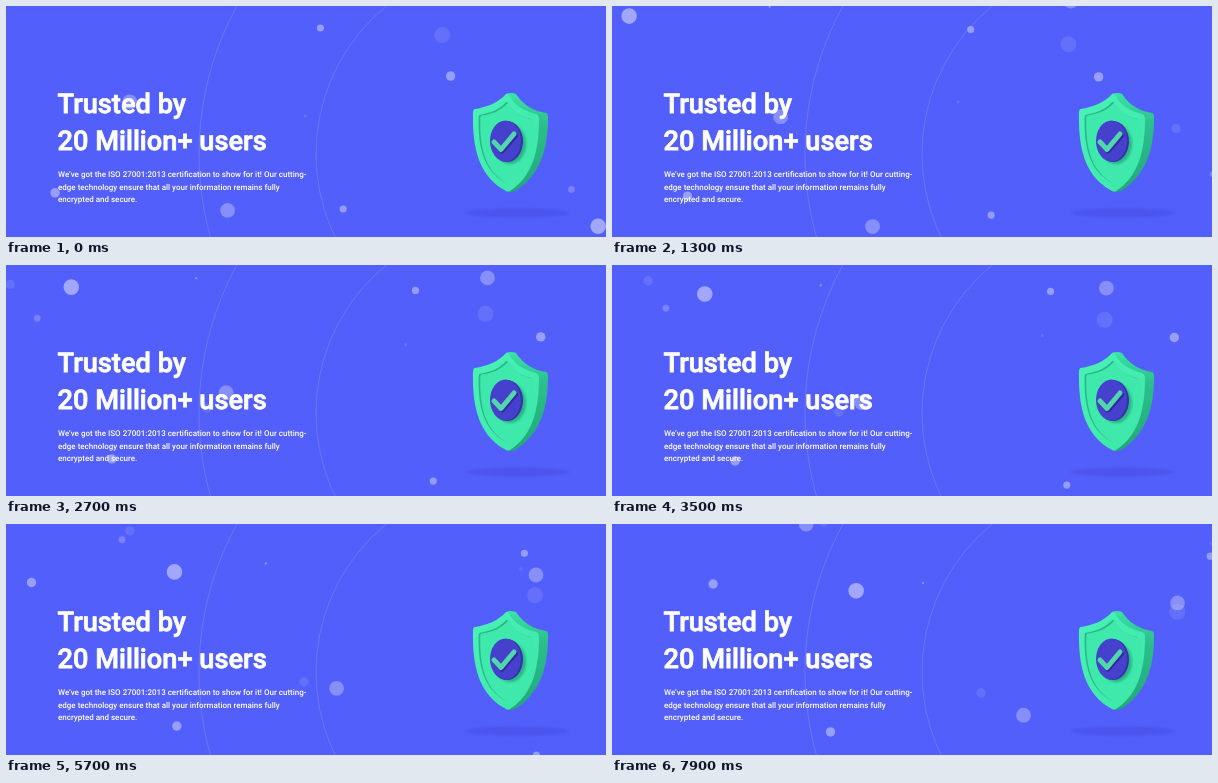
Recreate the animation shown at these times as an HTML page. Size 600 by 231 pixels, loop 8 s.

```html
<!DOCTYPE html>
<html lang="en">
<head>
<meta charset="utf-8">
<title>Trusted by 20 Million+ users</title>
<style>
  html, body { margin: 0; width: 100%; height: 100%; overflow: hidden; background: #535ffa; }
  svg { display: block; width: 600px; height: 231px; }
  text { font-family: Roboto, "Liberation Sans", sans-serif; font-weight: 500; fill: #fff; text-rendering: geometricPrecision; }
  .title { font-size: 27.2px; stroke: #fff; stroke-width: .8px; }
  .body { font-size: 8px; }
</style>
</head>
<body>
<svg viewBox="0 0 600 231">
  <defs>
    <linearGradient id="face" x1="0" y1="0" x2="1" y2="1">
      <stop offset="0" stop-color="#4bf2b8"/>
      <stop offset="1" stop-color="#3be6a6"/>
    </linearGradient>
    <linearGradient id="side" x1="0" y1="0" x2="0" y2="1">
      <stop offset="0" stop-color="#3be3a6"/>
      <stop offset=".3" stop-color="#2bc08d"/>
      <stop offset="1" stop-color="#22a67c"/>
    </linearGradient>
    <filter id="soft" x="-20%" y="-50%" width="140%" height="200%">
      <feGaussianBlur stdDeviation="1.2"/>
    </filter>
    <path id="plate" d="M500 88C492 97 481 101 469 103Q467 103 467 107C466 148 476 172 500 185Q502 186 504 185C524 172 533 150 533 113Q533 109 530 108C517 105 508 99 503 89Q501.5 87 500 88Z"/>
  </defs>
  <g fill="none" stroke="#fff" stroke-opacity=".14">
    <circle cx="501" cy="148" r="308"/>
    <circle cx="501" cy="148" r="191"/>
  </g>
  <g id="dots" fill="#fff"></g>

  <ellipse cx="511" cy="207" rx="52" ry="4.5" fill="#4b55ee" filter="url(#soft)"/>
  <path fill="url(#side)" d="M500 88Q505 86 510 88C518 100 528 105 540 107Q542.5 108 542 113C542 147 532 170 510 184.5Q505 187 500 185Z"/>
  <use href="#plate" fill="url(#face)"/>
  <g transform="translate(500 137) scale(.83) translate(-500 -137)">
    <use href="#plate" fill="#28b98a"/>
    <use href="#plate" x="2" y="1" fill="#3fe9ac"/>
  </g>
  <ellipse cx="504" cy="138" rx="16" ry="20" fill="#29b488" filter="url(#soft)"/>
  <ellipse cx="501" cy="135.5" rx="16" ry="20.5" fill="#3631a8"/>
  <ellipse cx="499.5" cy="135" rx="15.5" ry="20.5" fill="#4541cd"/>
  <g fill="none" stroke-width="5" stroke-linecap="round" stroke-linejoin="round">
    <path id="tick" stroke="#2f2a9c" d="M489 137.500l7 7.500l13.500-15.500"/>
    <path stroke="#52d6ad" d="M488 136l7 7.500l13-15.500"/>
  </g>

  <g class="title">
    <text x="51.5" y="106.500">Trusted by</text>
    <text x="51.5" y="144.200">20 Million+ users</text>
  </g>
  <g class="body">
    <text x="52" y="171">We’ve got the ISO 27001:2013 certification to show for it! Our cutting-</text>
    <text x="52" y="183.500">edge technology ensure that all your information remains fully</text>
    <text x="52" y="196">encrypted and secure.</text>
  </g>
</svg>
<script>
  const LOOP = 8000, STEP = 100, MID = 4, DRIFT = 34.4;
  const group = document.getElementById("dots");
  const dots = [];

  // Every dot drifts right at a shared speed (scaled by pace);
  // x, y is where it passes halfway through the loop, fall its px per second down.
  function layer(r, opacity, ...paths) {
    for (const [x, y, fall, pace = 1] of paths) {
      const el = document.createElementNS("http://www.w3.org/2000/svg", "circle");
      el.setAttribute("r", r);
      el.setAttribute("opacity", opacity);
      group.appendChild(el);
      dots.push({ el, x, y, fall, speed: DRIFT * pace });
    }
  }

  layer(7.8, .45, [110, 33.3, 8.6], [727, 232, 3]);
  layer(7.4, .3, [347, 256.5, 13.3, .93], [60, -39, 10], [268, 143.6, 12.2, 1.07], [502.5, 29.4, 12.7, .47]);
  layer(4.7, .4, [579.5, 72.8, .7], [-33, 57.3, .7], [134, 197.4, 2.7, .63]);
  layer(3.6, .38, [456.7, 27.1, 1.3, 1.055], [472, 222.6, 5]);
  layer(3.4, .22, [68, 37, -12.5, .82], [680, 134.5, -12.5, .85]);
  layer(8, .1, [501, 58.5, 7.5, .48]);
  layer(4.7, .11, [243, 149.5, 5, .94], [56, 14, -4.1, 1.16], [657, 109, -5]);
  layer(1.2, .3, [220.4, 24.6, 8.8, .675]);
  layer(1.6, .12, [449.6, 64.6, -11.6, 1.116]);

  function draw(now) {
    const s = Math.floor((now % LOOP) / STEP) * STEP / 1000;
    const t = s + .08 * Math.max(0, 1 - s / .6) - MID; // gentle start
    for (const { el, x, y, fall, speed } of dots) {
      el.setAttribute("cx", x + speed * t);
      el.setAttribute("cy", y + fall * t);
    }
  }

  let start;
  function tick(now) {
    start ??= now;
    draw(now - start);
    requestAnimationFrame(tick);
  }
  draw(0);
  requestAnimationFrame(tick);
</script>
</body>
</html>
```
